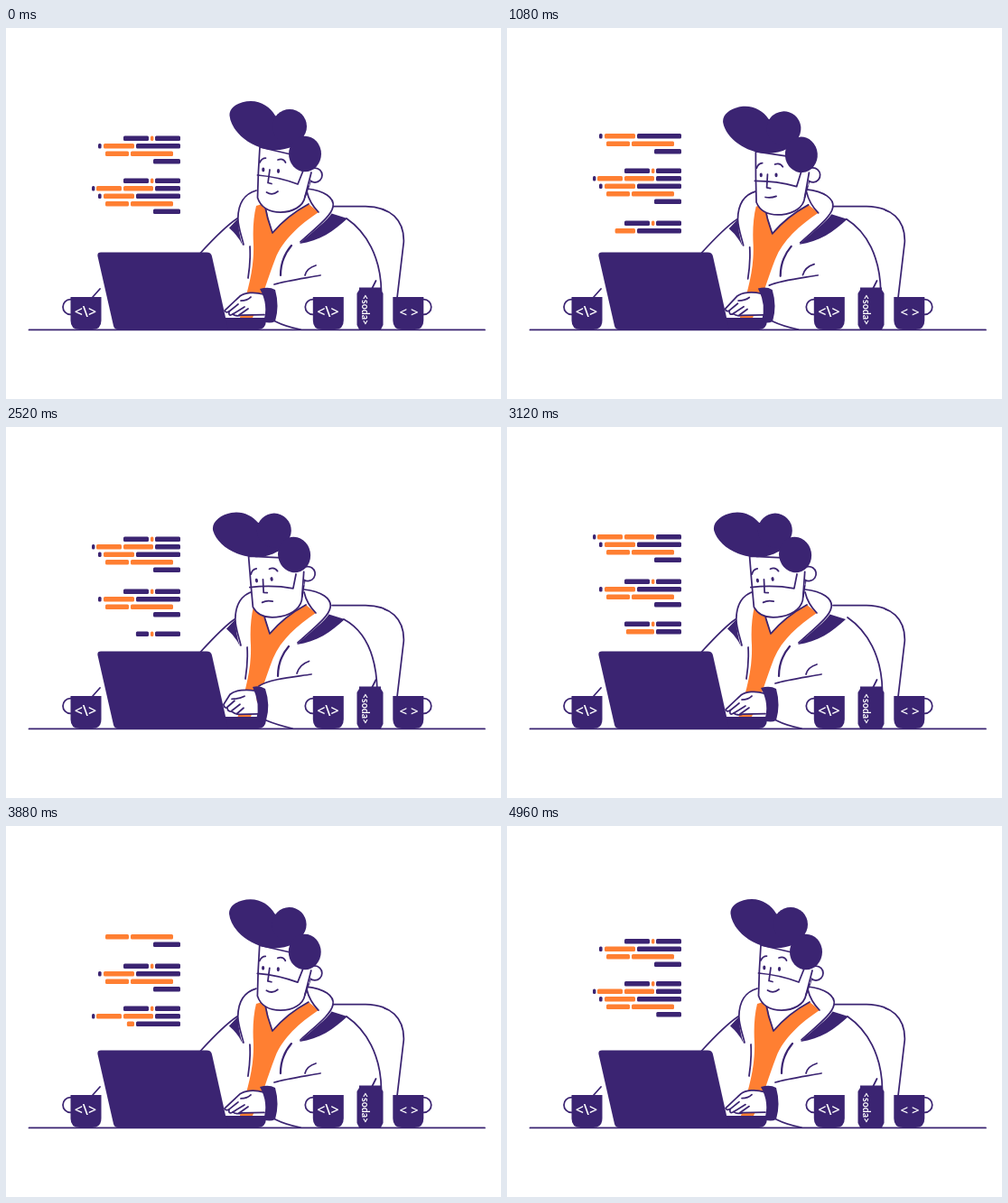
An HTML page that plays this animation: 548 px wide and 411 px high, repeating every 5000 ms.

```html
<!DOCTYPE html>
<html lang="en">
<head>
<meta charset="utf-8">
<title>Coding at the desk</title>
<style>
html, body { margin: 0; width: 100%; height: 100%; overflow: hidden; background: #fff; }
svg { display: block; width: 100vw; height: 100vh; }
.line { fill: none; stroke: #3b2472; stroke-width: 1.75; stroke-linecap: round; stroke-linejoin: round; }
.paper { fill: #fff; }
.ink { fill: #3b2472; }
.hot { fill: #ff7f32; }
text { font: 600 16px "Open Sans", sans-serif; fill: #fff; text-anchor: middle; }
.can { font: 700 10.5px Lato, sans-serif; }
</style>
</head>
<body>
<svg viewBox="0 0 548 411">
  <defs>
    <clipPath id="pane"><rect x="90" y="117" width="110" height="125"/></clipPath>
    <g id="mug">
      <circle class="line" cx="-17.200" cy="11" r="8.300"/>
      <path class="ink" d="M-17 0H17V26Q17 36 7 36H-7Q-17 36-17 26Z"/>
    </g>
  </defs>

  <g id="code" clip-path="url(#pane)"></g>

  <!-- chair -->
  <path class="line" d="M361 197.500H398C426 198 441 213 440.300 237L433 299"/>

  <!-- left arm -->
  <path class="line" data-mix="h" d="M256~253 211~213C244 219 232 231 215.500 249"/>

  <!-- torso -->
  <g id="torso">
    <path class="paper" d="M277 181C259 186 256 202 257 213L263 241L268 320L290 290L326 237C341 222 362 209 362 197C361 187 346 180 333 179Z"/>
    <path class="hot" d="M277 197L287 194Q290 211 295 227Q311 208 335 195L346 204C325 218 306 235 298 256C290 276 284 300 273 321H259C266 295 275 270 274 240C273 224 274 209 277 197Z"/>
    <path class="line" d="M277 180C263 184 257 196 256.800 211C257 221 261 231 263 240M333 178C352 180 364 188 362 198C360 209 342 222 326 237M286 194Q289 211 295 227Q311 208 335 195M333 181Q336 194 346 204"/>
    <path class="ink" d="M257 211L247 221.500Q257 230 262 241Q257 226 257 211Z"/>
    <path class="ink" d="M325 239C341 224 355 214 360.500 205.500L378 211C363 225 347 236 325 239Z"/>
    <path class="line" d="M270 242Q271 258 268 277"/>
    <path class="line" style="stroke-width:2.200" d="M316 241Q304 255 304 274"/>
  </g>

  <!-- head -->
  <g id="head">
    <path class="line paper" data-mix="h" d="M281 132Q279~278 160 278.500~275.500 188C282~279 199 292~290 204 304 204C317 204 329 198 331 187L337 170V145Z"/>
    <circle class="line paper" cx="342" cy="163" r="8"/>
    <path class="paper" d="M326 150H339L336 174L328 180Z"/>
    <path class="line" d="M338 160L331 187"/>
    <path class="ink" d="M247.500 97C247 87 259 81 271 81C283 81 293 88 298 97L330 118C325 132 305 138 287 134C265 129 249 112 247.500 97Z"/>
    <circle class="ink" cx="314" cy="109" r="19"/>
    <ellipse class="ink" cx="331" cy="139.500" rx="18" ry="19.800"/>
    <g id="face">
      <path class="line" data-mix="h" d="M278.500~276 163Q302 165 323 173L329 158"/>
      <ellipse class="ink" cx="284.800" cy="157" rx="1.600" ry="2.400"/>
      <ellipse class="ink" cx="301.500" cy="158.500" rx="1.600" ry="2.400"/>
      <path class="line" data-mix="h" d="M292 157L290 171.500L294 172.500M281~280 149Q283~282 144 287.500~287 144M301 146~147Q307 144~145.500 309.500 149~151"/>
      <path class="line" data-mix="h" d="M288.500~286.500 182Q295~292 186~180.500 301~298 181~183"/>
    </g>
  </g>

  <!-- laptop -->
  <path class="ink" d="M232 321H288V325Q287 334 279 334H122Z"/>
  <path class="ink" d="M105 248.600H222Q227 248.600 228 253L246 334H124Q120 334 119 330L101.500 253Q100.700 248.600 105 248.600Z"/>

  <!-- right arm -->
  <path class="paper" data-mix="a" d="M297~280 284~287Q320~300 279 348~338 274L380 300V333H326~317L298~288 325Z"/>
  <path class="line" data-mix="a" d="M377~374 211~213C399~398 226 415~410 254 415.500~411 292M297~280 284~287C310~292 280~279 332~318 277 348~338 274M331~322 274~273Q333~325 266~263 343~335.500 263~259.500M298~288 325Q310~300 331~330 326~317 334"/>
  <path class="line paper" data-mix="hand" d="M285~276 295~292C275~266 292~290 264~254 293~291 259~248 297~296L242~241 313~307Q243~241 316~311 247~245 314~311Q246~245 320~315 251~250 317~315Q255~254 320~318 261~258 318L286~280 317.500"/>
  <path class="line" data-mix="hand" d="M247~245 314~310L257~253 306~303M251~250 317~314L264~259 309~307M258~256 318~317L268~263 311M260~250 302~301Q267~258 302~301 271~264 298"/>
  <path class="ink" data-mix="a" d="M281~273 289~288Q291~281 286 298~287 290Q303~293 308 298~288 325Q292~283 328 285~277 325Q291~282 307 281~273 289~288Z"/>

  <!-- table -->
  <path class="line" d="M96 298L104 289M405 289L409.500 280"/>
  <path class="line" d="M25.500 334.400H530"/>
  <use href="#mug" x="88.500" y="298"/>
  <use href="#mug" x="356.800" y="298"/>
  <use href="#mug" transform="translate(445.300 298) scale(-1 1)"/>
  <path class="ink" d="M391 287.500H415V290L417.500 294V329L415 334H391L388.500 329V294L391 290Z"/>
  <text x="88" y="320">&lt;\&gt;</text>
  <text x="356.500" y="320">&lt;\&gt;</text>
  <text x="446" y="320" style="font-size:15px">&lt; &gt;</text>
  <text class="can" transform="translate(393.500 312) rotate(90)">&lt;soda&gt;</text>
</svg>

<script>
const LOOP = 5000, RIGHT = 193, SPEED = 0.132, PERIOD = 105;
const $ = id => document.getElementById(id);

// Segments per line kind, right to left: [x, width, class]
const kinds = {
  A: [[165, 28, 'ink'], [160, 3.4, 'hot'], [130, 28, 'ink']],
  B: [[144, 49, 'ink'], [108, 34, 'hot'], [102, 3.6, 'ink']],
  C: [[138, 47, 'hot'], [110, 26, 'hot']],
  D: [[163, 30, 'ink']],
  E: [[165, 28, 'ink'], [130, 33, 'hot'], [100, 28, 'hot'], [95, 3.4, 'ink']]
};
// Kind, distance below the first line, typing start, scroll when done
const lines = [
  ['A', 0, 48, 11], ['B', 8.5, 525, 16], ['C', 17, 1215, 12.5], ['D', 25.5, 1844, 5.5],
  ['A', 47, 2149, 11], ['E', 55.5, 2658, 16], ['B', 64, 3433, 15],
  ['C', 72.5, 4122, 12.5], ['D', 81, 4751, 5.5]
].map(([kind, y, start, step]) => {
  const segs = kinds[kind];
  return { segs, y, start, step, end: start + (RIGHT - segs[segs.length - 1][0]) / SPEED };
});

const bars = [];
for (const cycle of [-1, 0]) {
  for (const line of lines) {
    for (const [x, w, cls] of line.segs) {
      const el = document.createElementNS('http://www.w3.org/2000/svg', 'rect');
      el.setAttribute('class', cls);
      el.setAttribute('height', 5.4);
      el.setAttribute('rx', 1.5);
      $('code').append(el);
      bars.push({ el, x, w, line, typed: cycle < 0, y: 224.5 + cycle * PERIOD + line.y });
    }
  }
}

const mixed = [...document.querySelectorAll('[data-mix]')]
  .map(el => ({ el, d: el.getAttribute('d'), key: el.dataset.mix }));
const mix = (d, k) => d.replace(/([\d.]+)~([\d.]+)/g, (_, a, b) => (+a + (b - a) * k).toFixed(2));

const ease = (t, from, to) => {
  const p = Math.min(1, Math.max(0, (t - from) / (to - from)));
  return (1 - Math.cos(Math.PI * p)) / 2;
};

function drawCode(t) {
  const scroll = lines.reduce((sum, l) => sum + (t >= l.end ? l.step : 0), 0);
  for (const { el, x, w, line, typed, y } of bars) {
    const cursor = typed ? 0 : RIGHT - Math.max(0, t - line.start) * SPEED;
    const left = Math.max(x, cursor);
    el.setAttribute('x', left);
    el.setAttribute('y', y - scroll);
    el.setAttribute('width', Math.max(0, x + w - left));
  }
}

function drawPose(t) {
  const h = ease(t, 700, 1530) - ease(t, 3130, 3960);
  const a = ease(t, 780, 1480) - ease(t, 2520, 3080);
  const tap = 0.5 * Math.sin(t / LOOP * 40 * Math.PI);
  for (const { el, d, key } of mixed) {
    el.setAttribute('d', mix(d, key === 'h' ? h : a));
    if (key === 'hand') el.setAttribute('transform', `translate(0 ${tap})`);
  }
  $('torso').setAttribute('transform', `translate(${-3 * h} ${2 * h})`);
  $('head').setAttribute('transform',
    `translate(${331 - 12 * h} ${139 + 2 * h}) rotate(${-10.5 * h}) translate(-331 -139)`);
  $('face').setAttribute('transform', `translate(0 ${3 * h})`);
}

function frame() {
  const t = performance.now() % LOOP;
  drawCode(t);
  drawPose(t);
  requestAnimationFrame(frame);
}
frame();
</script>
</body>
</html>
```
